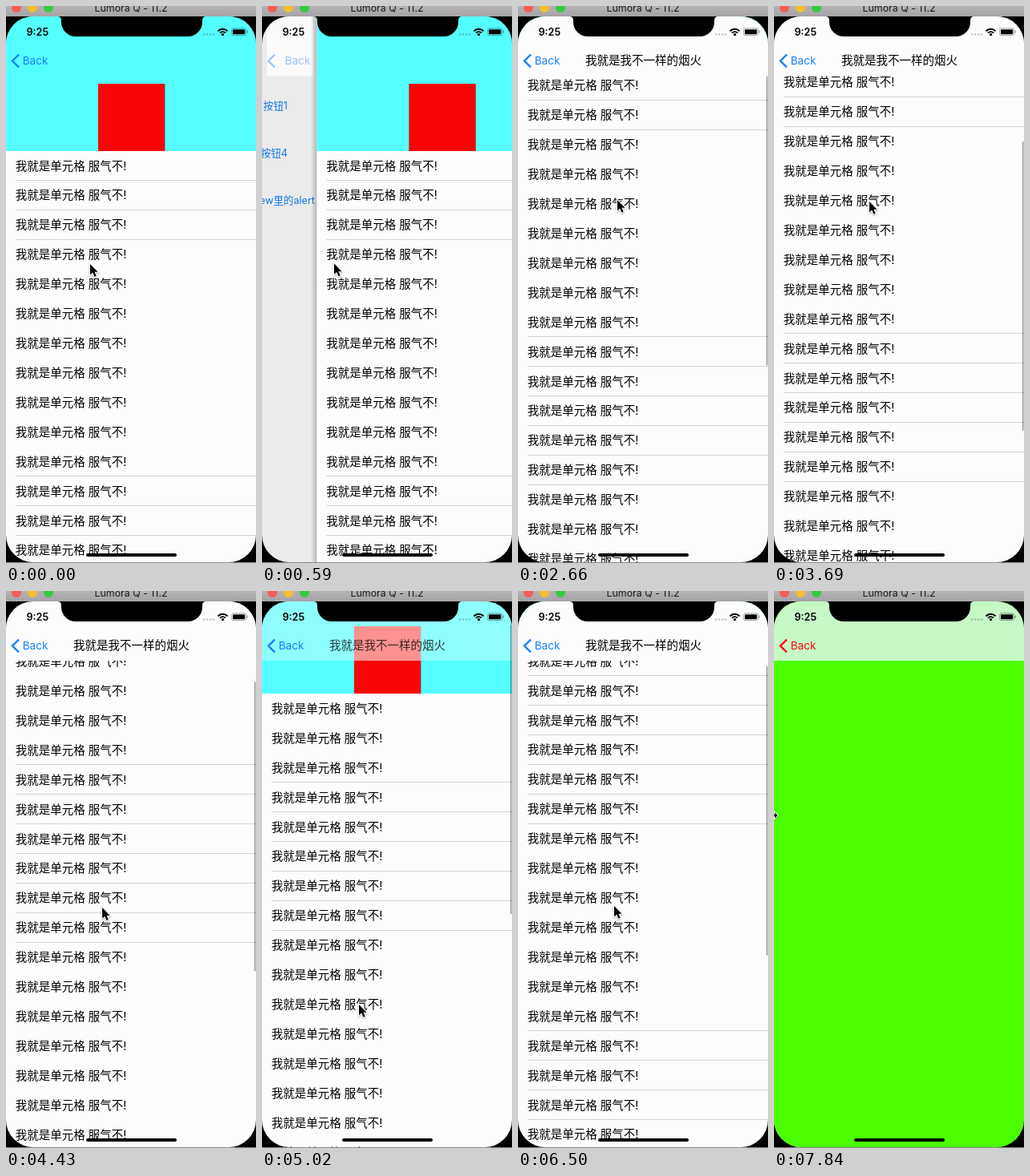
These frames come from a looping animation (312x695 px, 7.99 s). An HTML page with a canvas:

```html
<!DOCTYPE html>
<html lang="zh-CN">
<head>
<meta charset="utf-8">
<style>
  html, body { margin: 0; width: 100%; height: 100%; overflow: hidden; background: #000; }
  canvas { display: block; }
</style>
</head>
<body>
<canvas id="stage" width="312" height="695"></canvas>
<script>
const ctx = document.getElementById('stage').getContext('2d');
const LOOP = 7990, STEP = 147.8, LAST_STEP = 53;
const W = 312, TOP = 13, BOTTOM = 694, BAR_BOTTOM = 87;
const HEADER = 168, ROW = 36.92, ROWS = 30;
const FONT = 'Inter, "Noto Sans CJK SC", "Noto Sans CJK", "Noto Sans CJK JP", sans-serif';
const BLUE = '#157efb', RED = '#f80606';

const clamp = v => Math.max(0, Math.min(1, v));
const ramp = (n, from, to) => clamp((n - from) / (to - from));
const ease = (n, from, to) => { const u = ramp(n, from, to); return u * u * (3 - 2 * u); };

// All motion is a function of the step number n.
const swipeAt = n => n < 9 ? 264 * ease(n, 2, 8) : n < 12 ? 64 * .22 ** (n - 9) : 0;
const scrollAt = n => 288.75 * (ease(n, 14, 22.28) - ease(n, 25, 37.37)) + 176.26 * ease(n, 38, 46);
const pushAt = n => 1 - (1 - ramp(n, 46, 50)) ** 2;

// Places where the pointer turns: step, x, y.
const POINTER = [[0, 105, 322], [2, 3, 321], [8, 264, 322], [9, 31, 321], [14, 124, 380],
  [18, 124, 242], [25, 119, 244], [34, 121, 516], [44, 120, 393], [53, 0, 280]];

function pointerAt(n) {
  const i = Math.max(1, POINTER.findIndex(p => p[0] >= n));
  const [n0, x0, y0] = POINTER[i - 1], [n1, x1, y1] = POINTER[i];
  const u = ramp(n, n0, n1);
  return [x0 + (x1 - x0) * u, y0 + (y1 - y0) * u];
}

function rect(x, y, w, h, color) {
  ctx.fillStyle = color;
  ctx.fillRect(x, y, w, h);
}

function pill(x, y, w, h, r, color) {
  ctx.fillStyle = color;
  ctx.beginPath();
  ctx.roundRect(x, y, w, h, r);
  ctx.fill();
}

const dot = (x, y, r, color) => pill(x - r, y - r, 2 * r, 2 * r, r, color);

function text(str, x, y, size, color = '#000', weight = 400, align = 'left') {
  ctx.font = `${weight} ${size}px ${FONT}`;
  ctx.textAlign = align;
  ctx.fillStyle = color;
  ctx.fillText(str, x, y);
}

function withAlpha(alpha, draw) {
  ctx.save();
  ctx.globalAlpha = clamp(alpha);
  draw();
  ctx.restore();
}

function pane(x, draw) {
  ctx.save();
  ctx.translate(x, 0);
  ctx.beginPath();
  ctx.rect(0, TOP, W, BOTTOM - TOP);
  ctx.clip();
  draw();
  ctx.restore();
}

function edgeShadow(x) {
  const g = ctx.createLinearGradient(x - 8, 0, x, 0);
  g.addColorStop(0, 'rgba(0,0,0,0)');
  g.addColorStop(1, 'rgba(0,0,0,.22)');
  rect(x - 8, TOP, 8, BOTTOM - TOP, g);
}

function drawMenu(swipe) {
  pane(-.3 * (W - swipe), () => {
    rect(0, TOP, W, BOTTOM - TOP, '#fff');
    ['按钮1', '按钮4'].forEach((label, i) => text(label, 105, 129 + 59 * i, 12.6, BLUE, 400, 'right'));
    text('View里的alert', 139, 247, 12.6, BLUE, 400, 'right');
    rect(0, TOP, W, BOTTOM - TOP, `rgba(0,0,0,${.1 * (1 - swipe / W)})`);
  });
  rect(6, TOP, Math.max(0, swipe - 11), BAR_BOTTOM - TOP, '#fbfbfb');
}

function drawHeader(scroll, barAlpha) {
  const y = Math.round(TOP - scroll);
  rect(0, y, W, HEADER, '#0ff');
  rect(115, y + 84, 83.3, 84, RED);
  withAlpha(barAlpha, () => rect(0, TOP, W, BAR_BOTTOM - TOP, '#fdfdfd'));
  // The screen cannot show pure cyan, so red never falls below a floor.
  ctx.save();
  ctx.globalCompositeOperation = 'lighten';
  rect(0, y, W, HEADER, '#500');
  ctx.restore();
}

function drawList(x, scroll, dim) {
  const barAlpha = clamp(scroll / 94);
  pane(x, () => {
    rect(0, TOP, W, BOTTOM - TOP, '#fdfdfd');
    for (let i = 0; i < ROWS; i++) {
      const y = TOP + HEADER - scroll + i * ROW;
      text('我就是单元格 服气不!', 11.7, y + 23.5, 14.5);
      // Hairlines drop out where they fall between device pixels.
      const line = y + 36.4, phase = line - Math.floor(line);
      if (phase > .16 && phase < .66) rect(12, Math.floor(line), W, 1, '#d4d4d6');
    }
    drawHeader(scroll, barAlpha);
    withAlpha(Math.sqrt(barAlpha), () =>
      text('我就是我不一样的烟火', 156.5, 73.2, 14.5, '#000', 400, 'center'));
    rect(0, TOP, W, BOTTOM - TOP, `rgba(0,0,0,${dim})`);
  });
}

function drawGreen(x) {
  pane(x, () => {
    rect(0, TOP, W, BOTTOM - TOP, '#4bff00');
    rect(0, TOP, W, BAR_BOTTOM - TOP, '#c6f9c6');
  });
}

function drawBack(swipe, color) {
  const progress = swipe / W;
  withAlpha(1 - 2.6 * progress, () => {
    ctx.strokeStyle = color;
    ctx.lineWidth = 2.4;
    ctx.beginPath();
    ctx.moveTo(16, 60.5);
    ctx.lineTo(8, 68.5);
    ctx.lineTo(16, 76.5);
    ctx.stroke();
    text('Back', 20.7 + 36 * progress, 73.3, 13.6, color);
  });
}

function drawStatus() {
  text('9:25', 25.5, 37, 12.6, '#000', 600);
  for (let i = 0; i < 4; i++) pill(245.8 + i * 4, 34.2, 2.6, 2.6, 1, 'rgba(0,0,0,.22)');
  ctx.strokeStyle = '#000';
  ctx.lineWidth = 1.9;
  for (const r of [4.9, 8.3]) {
    ctx.beginPath();
    ctx.arc(270.5, 37, r, -Math.PI * .76, -Math.PI * .24);
    ctx.stroke();
  }
  dot(270.5, 35.6, 1.7, '#000');
  ctx.strokeStyle = 'rgba(0,0,0,.4)';
  ctx.lineWidth = .9;
  ctx.beginPath();
  ctx.roundRect(281.6, 27.8, 18, 8.8, 2.3);
  ctx.stroke();
  pill(283, 29.2, 15.2, 6, 1.2, '#000');
  pill(300.6, 30.6, 1.2, 3.2, .6, 'rgba(0,0,0,.4)');
}

function drawNotch() {
  ctx.fillStyle = '#000';
  ctx.beginPath();
  ctx.moveTo(64, TOP);
  ctx.quadraticCurveTo(69, TOP, 69, 18);
  ctx.arcTo(69, 38, 90, 38, 18);
  ctx.arcTo(245, 38, 245, 18, 18);
  ctx.lineTo(245, 18);
  ctx.quadraticCurveTo(245, TOP, 250, TOP);
  ctx.fill();
}

function drawWindowTitle() {
  const g = ctx.createLinearGradient(0, 0, 0, TOP);
  g.addColorStop(0, '#b4b2b4');
  g.addColorStop(1, '#a5a3a5');
  rect(0, 0, W, TOP, g);
  ['#f55d56', '#f7bc30', '#39c842'].forEach((c, i) => dot(13 + i * 20, 2, 6, c));
  text('Lumora Q - 11.2', 156, 7.3, 12.4, '#1c1c1c', 400, 'center');
}

function drawPointer(x, y) {
  const shape = new Path2D(x < 6
    ? 'M-4-1H1V-3.5L4.5 0 1 3.5V1H-4Z'
    : 'M0 0V13.5L3.2 10.6 5.4 15.8 7.7 14.8 5.5 9.8H9.6Z');
  ctx.save();
  ctx.translate(x, y);
  ctx.shadowColor = 'rgba(0,0,0,.35)';
  ctx.shadowBlur = 2;
  ctx.shadowOffsetY = 1;
  ctx.lineWidth = 2;
  ctx.strokeStyle = '#fff';
  ctx.stroke(shape);
  ctx.shadowColor = 'transparent';
  ctx.fillStyle = '#000';
  ctx.fill(shape);
  ctx.restore();
}

function draw(n) {
  const swipe = swipeAt(n), scroll = scrollAt(n), push = pushAt(n);
  rect(0, 0, W, 695, '#000');
  drawWindowTitle();
  ctx.save();
  ctx.beginPath();
  ctx.roundRect(0, TOP, W, BOTTOM - TOP, 34);
  ctx.clip();
  if (swipe > 0) {
    drawMenu(swipe);
    edgeShadow(swipe);
  }
  drawList(swipe - .3 * W * push, scroll, .1 * push);
  if (push > 0) {
    edgeShadow(W * (1 - push));
    drawGreen(W * (1 - push));
  }
  drawBack(swipe, push > .5 ? '#fa0a0a' : BLUE);
  drawStatus();
  if (n >= 15 && n < 47) pill(310, TOP + 1 + scroll * .537, 1.4, 361, .7, 'rgba(0,0,0,.42)');
  pill(100, 683, 113, 4, 2, '#000');
  ctx.restore();
  drawNotch();
  rect(0, BOTTOM, W, 1, '#8a8a8a');
  drawPointer(...pointerAt(n));
}

function tick() {
  const t = performance.now() % LOOP;
  draw(Math.min(LAST_STEP, Math.floor((t + 10) / STEP)));
  requestAnimationFrame(tick);
}
tick();
</script>
</body>
</html>
```
